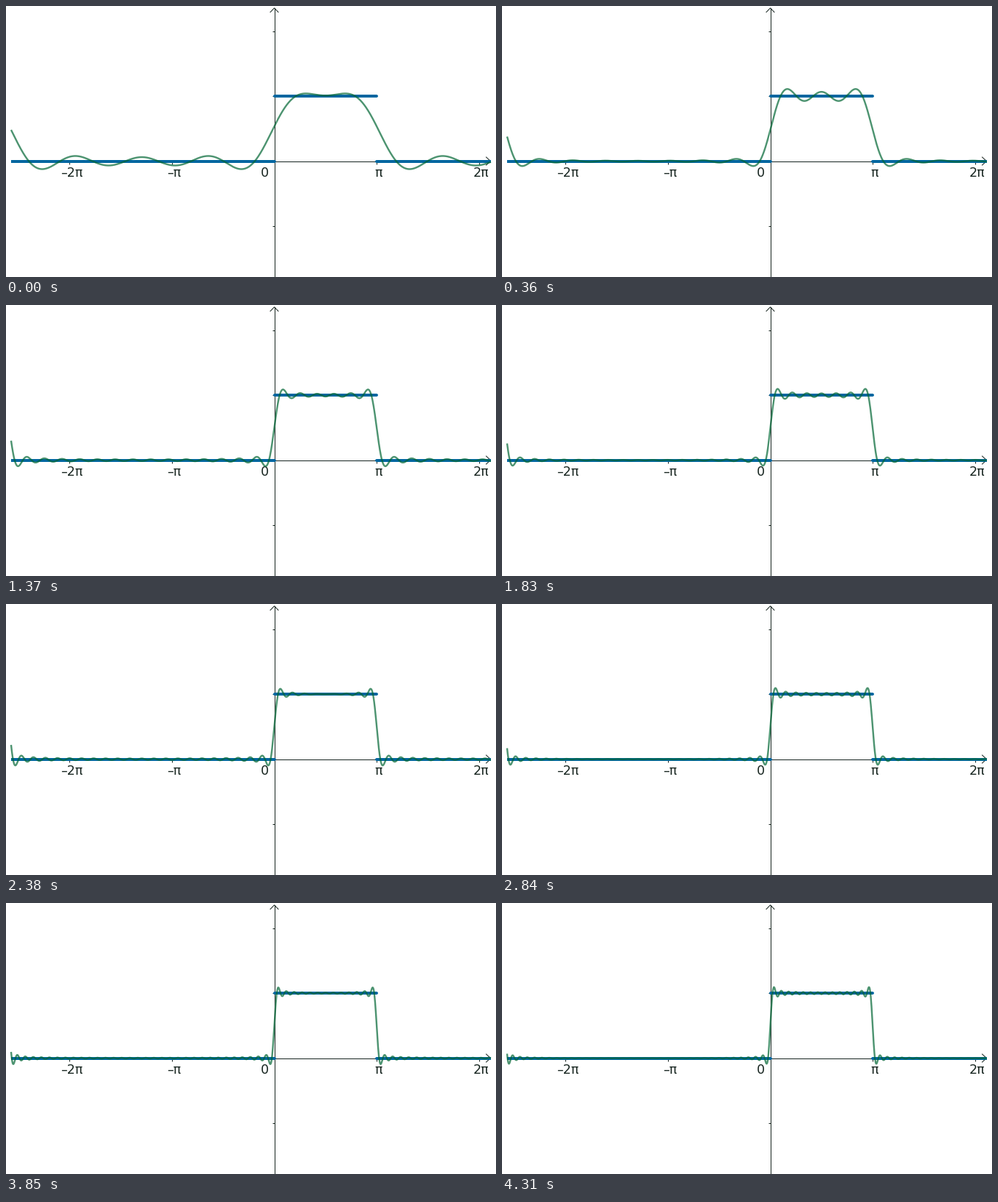
Write a matplotlib script that moves like this. It is 673 by 373 pixels and loops after 4.86 s.

```python
"""Fourier partial sums closing in on a rectangular pulse."""
import matplotlib.pyplot as plt
import numpy as np
from matplotlib.animation import FuncAnimation

W, H, DPI = 673, 373, 64
PT = 72 / DPI                      # points per pixel
LEFT, RIGHT = 7, 666
X0, Y0 = 368.5, 213.6              # origin in pixels
SX, SY = 44.75, 89.5               # pixels per unit
PERIOD = 11.275

LOOP, STEP = 4860, 10
STARTS = [0, 360, 820, 1370, 1830, 2380, 2840, 3320, 3850, 4310]

INK = "#16241f"
BLUE = "#0066a0"
GREEN = "#006633"


def px(x):
    return X0 + SX * x


def py(y):
    return Y0 - SY * y


def partial_sum(x, terms):
    """Fourier series of the pulse that is 1 on [0, pi]."""
    total = np.full_like(x, np.pi / PERIOD)
    for n in range(1, terms + 1):
        w = 2 * np.pi * n / PERIOD
        total += 4 / (PERIOD * w) * np.sin(w * np.pi / 2) * np.cos(w * (x - np.pi / 2))
    return total


fig = plt.figure(figsize=(W / DPI, H / DPI), dpi=DPI, facecolor="white")
ax = fig.add_axes([0, 0, 1, 1])
ax.set_xlim(0, W)
ax.set_ylim(H, 0)
ax.axis("off")


def stroke(xs, ys, width=1, color=INK, **kw):
    return ax.plot(xs, ys, color=color, lw=width * PT, **kw)[0]


# axes with open arrowheads
stroke([LEFT, 665], [213.5, 213.5])
stroke([X0, X0], [H, 3])
stroke([659.5, 665.5, 659.5], [208, 213.5, 219], solid_joinstyle="miter")
stroke([363, X0, 374], [8.5, 2.8, 8.5], solid_joinstyle="miter")

for k in (-2, -1, 1, 2):
    stroke([px(k * np.pi)] * 2, [214, 217.5], solid_capstyle="butt")
for k in (-1, 1, 2):
    stroke([365.5, X0], [py(k)] * 2, solid_capstyle="butt")

for x, label in ((90.5, "–2π"), (230.5, "–π"), (355.3, "0"), (512, "π"), (653, "2π")):
    ax.text(x, 235, label, color=INK, ha="center", va="baseline",
            family="DejaVu Sans", size=17.5 * PT)

# the pulse itself
window = plt.Rectangle((LEFT, 0), RIGHT - LEFT, H, transform=ax.transData)
edge = px(np.pi)
for a, b, level in ((0, X0, 0), (X0, edge, 1), (edge, W, 0)):
    line = stroke([a, b], [py(level)] * 2, 4, BLUE, solid_capstyle="round")
    line.set_clip_path(window)

xs = np.arange(LEFT, RIGHT + 0.25, 0.5)
curves = [py(partial_sum((xs - X0) / SX, 5 * (i + 1))) for i in range(len(STARTS))]
curve = stroke(xs, curves[0], 2.4, GREEN, alpha=0.7, solid_capstyle="butt", zorder=4)


def draw(i):
    stage = sum(start <= i * STEP for start in STARTS) - 1
    curve.set_ydata(curves[stage])
    return (curve,)


anim = FuncAnimation(fig, draw, frames=LOOP // STEP, interval=STEP,
                     repeat=True, repeat_delay=0, blit=False)
plt.show()
```
